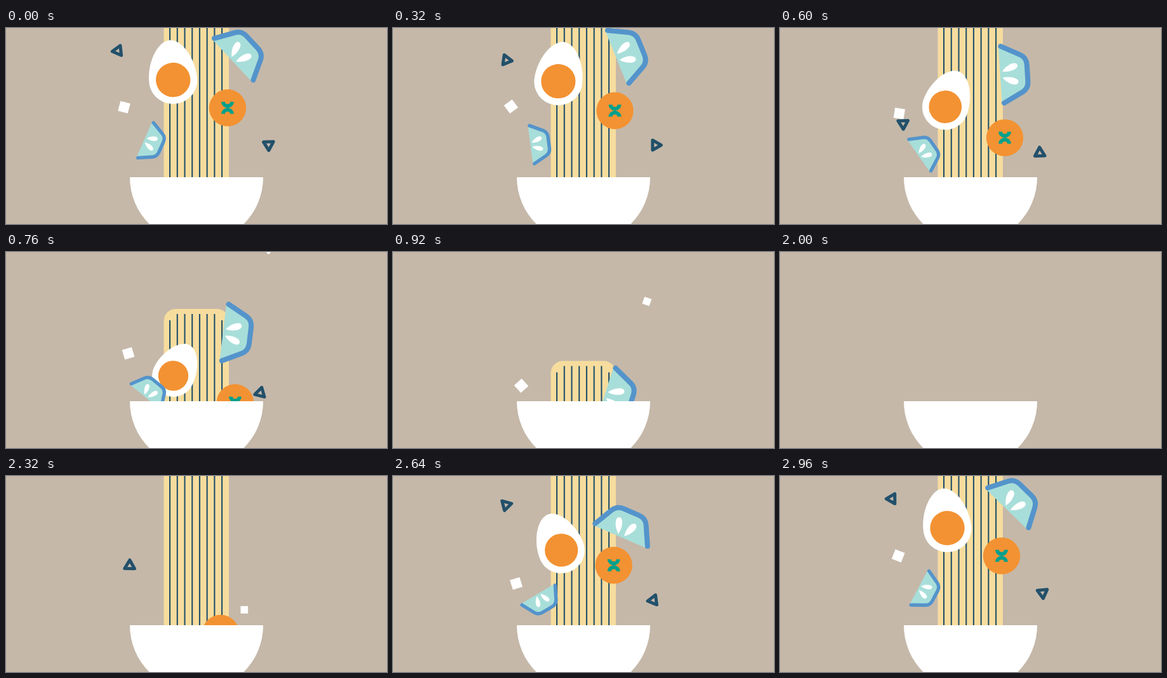
An HTML page with a canvas that plays this animation: 600 px wide and 310 px high, repeating every 3 s.

```html
<!DOCTYPE html>
<html lang="en">
<head>
<meta charset="utf-8">
<title>Noodle bowl</title>
<style>
  html, body { margin: 0; width: 100%; height: 100%; overflow: hidden; background: #c5b8a9; }
  canvas { display: block; }
</style>
</head>
<body>
<canvas id="stage" width="600" height="310"></canvas>
<script>
const ctx = document.getElementById('stage').getContext('2d');
const LOOP = 3000, RIM = 236;
const BG = '#c5b8a9', NOODLE = '#f6dc9d', NAVY = '#22506a', ORANGE = '#f39232',
      TEAL = '#a8ded9', BLUE = '#5494cb', GREEN = '#00a08c', WHITE = '#fff';

function fill(color, path) {
  ctx.fillStyle = color;
  ctx.fill(path);
}

function stroke(color, width, path) {
  ctx.strokeStyle = color;
  ctx.lineWidth = width;
  ctx.stroke(path);
}

function disc(x, y, r) {
  const path = new Path2D();
  path.arc(x, y, r, 0, 2 * Math.PI);
  return path;
}

const eggShape = new Path2D('M0-50.5C19-50.5 38-19 38 13C38 34 21 50.5 0 50.5S-38 34-38 13C-38-19-19-50.5 0-50.5Z');
const peelLine = 'M-45 20L-29.5-10Q-24.5-19.5-13-19.5H13Q24.5-19.5 29.5-10L45 20';
const peel = new Path2D(peelLine);
const flesh = new Path2D(peelLine + 'V23.5H-45Z');
const seed = new Path2D('M0 0C-7-11-7-26 0-26S7-11 0 0Z');
const cross = new Path2D('M-7-9.5A7 6.5 0 0 0 7-9.5M-7 9.5A7 6.5 0 0 1 7 9.5');
const triangleShape = new Path2D('M9 0L-4.5 7.8V-7.8Z');

function egg() {
  fill(WHITE, eggShape);
  fill(ORANGE, disc(0, 12.5, 27.2));
}

function carrot() {
  fill(ORANGE, disc(0, 0, 29.2));
  ctx.lineCap = 'butt';
  stroke(GREEN, 6, cross);
}

function lime(scale) {
  ctx.scale(scale, scale);
  ctx.lineCap = 'round';
  fill(TEAL, flesh);
  stroke(BLUE, 8, peel);
  for (const side of [-1, 1]) {
    ctx.save();
    ctx.translate(side * 5, 20);
    ctx.rotate(side * 0.36);
    fill(WHITE, seed);
    ctx.restore();
  }
}

function square(size) {
  ctx.fillStyle = WHITE;
  ctx.fillRect(-size / 2, -size / 2, size, size);
}

function triangle() {
  stroke(NAVY, 5, triangleShape);
}

// x, y: highest point, reached at time peak (s). up/down: [speed factor, sideways drift per px].
// angle: degrees at time 0, spin: degrees per second, shrink: scale lost per px below the top.
const items = [
  { draw: egg, x: 262.1, y: 69.4, peak: 0.1, up: [560, -0.03], down: [497, 0.055], angle: -5, spin: 43, shrink: 0.0011 },
  { draw: carrot, x: 349, y: 126.3, peak: 0.028, up: [412, -0.09], down: [332, 0.106], angle: 0, spin: 0 },
  { draw: () => lime(1), x: 373.4, y: 35.6, peak: 0.08, up: [700, -0.15], down: [361, -0.088], angle: 47, spin: 65.5 },
  { draw: () => lime(0.675), x: 232.2, y: 182.6, peak: 0.2, up: [133, 0.23], down: [262, -0.08], angle: 114, spin: -98 },
  { draw: () => square(16), x: 185.8, y: 124, peak: 0.2, up: [352, 0.18], down: [275, 0.185], angle: 15, spin: -160 },
  { draw: () => square(11.7), x: 424, y: -70, peak: 0.15, up: [543, -0.173], down: [368, -0.163], angle: -17, spin: -157 },
  { draw: triangle, x: 176.3, y: 36, peak: -0.03, up: [481, 0.174], down: [577, 0.153], angle: 54, spin: -143 },
  { draw: triangle, x: 413.5, y: 184.6, peak: 0.08, power: 4, up: [320, -0.3], down: [178, -0.34], angle: 88, spin: 100 }
];

function drawItem(item, t) {
  const { draw, x, y, peak, up, down, angle, spin, power = 3.5, shrink = 0 } = item;
  const [speed, drift] = t < peak ? up : down;
  const drop = speed * Math.abs(t - peak) ** power;
  if (y + drop > RIM + 80) return;
  const scale = 1 - shrink * drop;
  ctx.save();
  ctx.translate(x + drift * drop, y + drop);
  ctx.rotate((angle + spin * t) * Math.PI / 180);
  ctx.scale(scale, scale);
  draw();
  ctx.restore();
}

function drawNoodles(t) {
  const height = t < 0
    ? 2700 * Math.max(0, t + 1) ** 2
    : 645 * Math.max(0, 1.24 - t) ** 2;
  const top = Math.max(-40, 238 - height);
  const sheet = new Path2D();
  sheet.roundRect(248.5, top, 102.5, 400, 19);
  fill(NOODLE, sheet);
  ctx.fillStyle = NAVY;
  for (let i = 0; i < 8; i++) {
    const inset = i % 7 ? 8 : 18;
    ctx.fillRect(257 + i * 11.72, top + inset, 2.1, 400);
  }
}

function render(t) {
  ctx.fillStyle = BG;
  ctx.fillRect(0, 0, 600, 310);
  ctx.save();
  ctx.beginPath();
  ctx.rect(0, 0, 600, RIM);
  ctx.clip();
  ctx.lineJoin = 'round';
  drawNoodles(t);
  items.forEach(item => drawItem(item, t));
  ctx.restore();

  ctx.fillStyle = WHITE;
  ctx.beginPath();
  ctx.arc(300, RIM, 105, 0, Math.PI);
  ctx.fill();
}

// Time 0 is the top of the toss; the second half of the loop counts up to it.
function tick() {
  const ms = performance.now() % LOOP;
  render((ms < LOOP / 2 ? ms : ms - LOOP) / 1000);
  requestAnimationFrame(tick);
}
tick();
</script>
</body>
</html>
```
